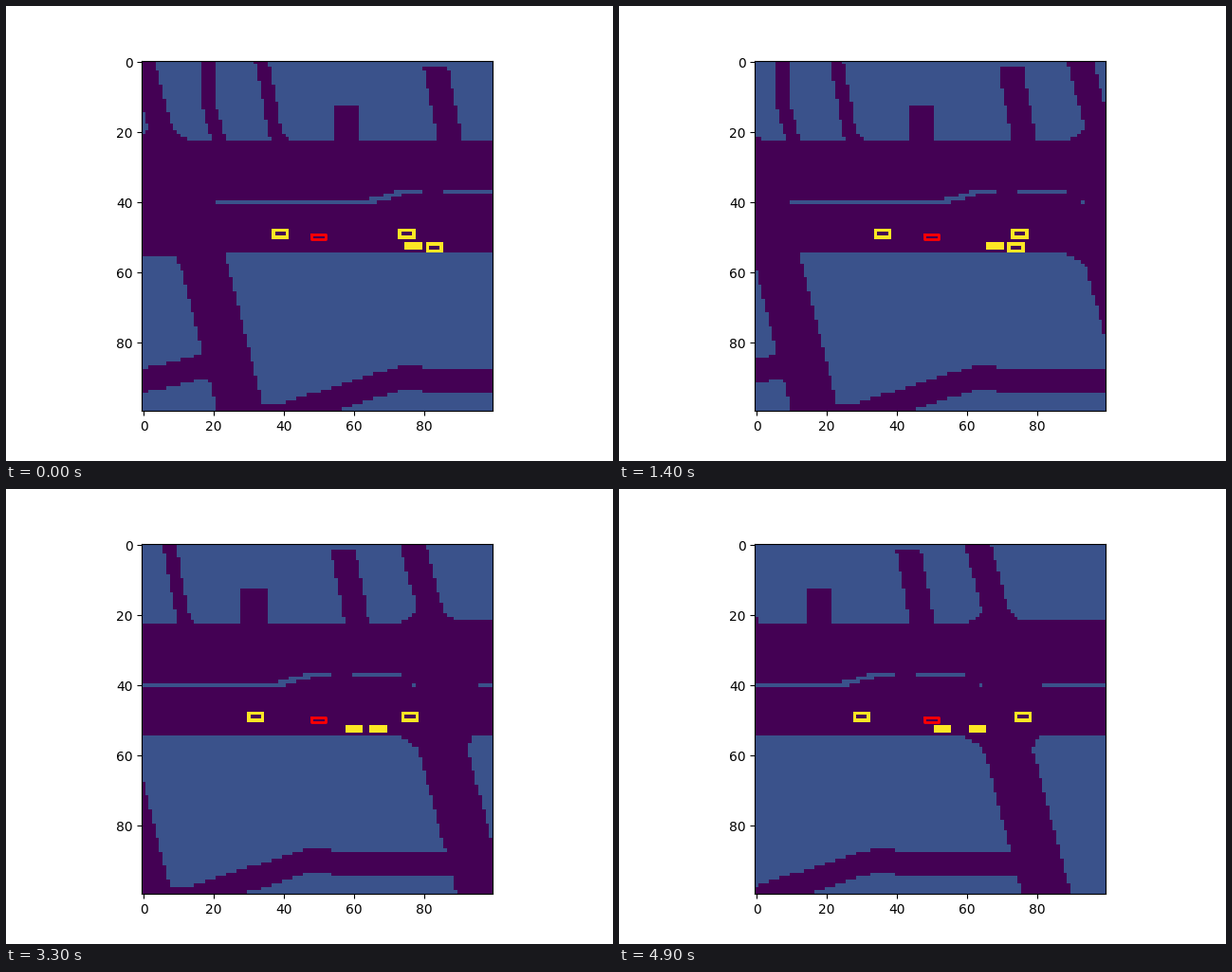
Recreate the animation shown at these times as a matplotlib script. Size 640 by 480 pixels, loop 5000 ms.

```python
import matplotlib.pyplot as plt
import numpy as np
from matplotlib.animation import FuncAnimation

SIZE = 100
FRAMES = 50
INTERVAL = 100
ROAD, BLOCK, CAR = 0, 1, 4
NORTH_CURB, SOUTH_CURB = 23, 55
ROWS, COLS = np.mgrid[:SIZE, :SIZE] + 0.5


def scroll(t):
    """Cells the map has moved left after t seconds."""
    return 7.7 * t + 0.1 * t**2


def street(x, along, curb_gap, start, slope, width, flare=(0, 0), bend=0):
    """Slanted side street that widens close to the main road."""
    left = start + slope * np.maximum(along - bend, 0)
    spread = np.clip(1 - curb_gap / 4, 0, 1) ** 1.5
    return ((along >= 0) & (x >= left - flare[0] * spread)
            & (x < left + width + flare[1] * spread))


def north_street(x, y, start, slope, width, flare=(0, 0), bend=0, top=0):
    inside = street(x, y, NORTH_CURB - y, start, slope, width, flare, bend)
    return inside & (y < NORTH_CURB) & (y > top)


def south_street(x, y, start, slope, width, flare=(0, 0)):
    depth = y - SOUTH_CURB
    return street(x, depth, depth, start, slope, width, flare)


def main_road(x, y):
    top = np.where(x < 105, NORTH_CURB, NORTH_CURB - 1)
    bottom = np.where(x < 20, SOUTH_CURB + 1, SOUTH_CURB)
    return (y > top) & (y < bottom)


def back_road(x, y):
    """Road of constant height along the bottom of the map."""
    middle = np.interp(x, [0, 18, 35, 41, 73, 80, 81.5],
                       [91.6, 87.2, 101.5, 101, 90.9, 90.9, 91.5])
    return (abs(y - middle) < 3.5) & (x < 120)


def median_strip(x, y):
    """Thin divider that swings up and back, broken by gaps."""
    middle = np.interp(x, [64.5, 75, 101, 103.5], [40.5, 37.5, 37.5, 40.5])
    gaps = (((x > 80) & (x < 86)) | ((x > 100.4) & (x < 103.7))
            | ((x > 104.7) & (x < 122.4)))
    return (abs(y - middle) < 0.75) & (x > 20.6) & ~gaps


def city(x, y):
    roads = (main_road(x, y) | back_road(x, y)
             | north_street(x, y, -3.3, 0.26, 7, flare=(4, 4))
             | north_street(x, y, 16.9, 0.28, 4.1, bend=12)
             | north_street(x, y, 32.4, 0.185, 3.8, flare=(0, 1.5))
             | north_street(x, y, 54.8, 0, 7.5, top=13)
             | north_street(x, y, 80, 0.195, 7, top=2)
             | north_street(x, y, 99.9, 0.265, 7.5, flare=(6, 4))
             | south_street(x, y, 10.2, 0.25, 13.5, flare=(2, 0))
             | south_street(x, y, 104.4, 0.265, 14, flare=(5, 3)))
    return np.where(roads & ~median_strip(x, y), ROAD, BLOCK)


def draw_car(grid, left, top, height):
    """Outline of a car five cells long; two-row cars come out solid."""
    left = round(left)
    grid[[top, top + height - 1], left:left + 5] = CAR
    grid[top:top + height, [left, left + 4]] = CAR


def scene(t):
    grid = city(COLS + scroll(t), ROWS)
    draw_car(grid, 36.8 - 2.4 * t + 0.13 * t**2, 48, 3)
    draw_car(grid, 73 + 0.18 * t, 48, 3)
    draw_car(grid, 75 - 4.2 * t - 3.5 * (1 - np.exp(-t / 0.9)), 52, 2)
    draw_car(grid, 80.95 - 6.95 * t + 0.6 * t**2, 52, 3 if t < 2.7 else 2)
    return grid


fig, ax = plt.subplots(figsize=(6.4, 4.8), dpi=100)
image = ax.imshow(scene(0), cmap="viridis", vmin=ROAD, vmax=CAR)
ax.plot([48, 52, 52, 48, 48], [49.1, 49.1, 50.6, 50.6, 49.1],
        color="red", lw=2)
ax.set_xlim(-0.5, SIZE - 0.5)
ax.set_ylim(SIZE - 0.5, -0.5)


def update(frame):
    image.set_data(scene(frame * INTERVAL / 1000))
    return [image]


anim = FuncAnimation(fig, update, frames=FRAMES, interval=INTERVAL,
                     repeat=True, repeat_delay=0)
plt.show()
```
